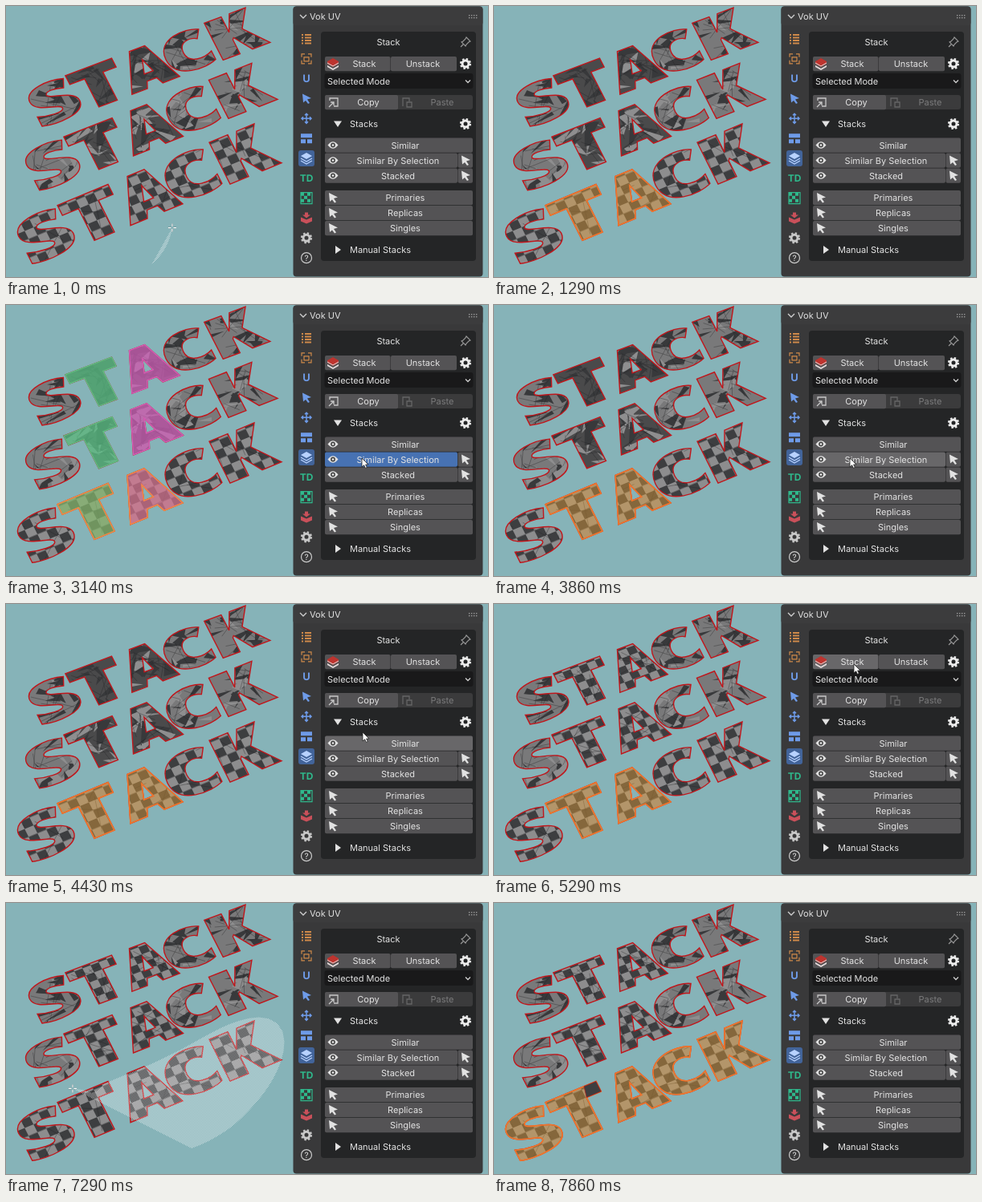
Animation, 600 px wide and 338 px high, one loop 8000 ms. Source, as an HTML page:

```html
<!DOCTYPE html>
<html lang="en">
<head>
<meta charset="utf-8">
<title>Stack islands</title>
<style>
html, body { margin: 0; width: 100%; height: 100%; overflow: hidden; background: #86b3b8; }
svg { display: block; width: 100vw; height: 100vh; }
text { font: 11px Inter, sans-serif; fill: #e2e2e2; text-rendering: geometricPrecision; }
.mid { text-anchor: middle; }
.btn { fill: #545355; }
.btn.hover { fill: #686769; }
.btn.on { fill: #4772b3; }
#letters path { vector-effect: non-scaling-stroke; fill-rule: evenodd; }
.wire { stroke: #242526; stroke-width: .5; opacity: .7; fill: none; }
.edge { fill: none; stroke: #c0161b; stroke-width: 1.4; }
.sel { fill: rgba(232, 160, 55, .42); stroke: #f0762c; stroke-width: 1.6; }
</style>
</head>
<body>
<svg viewBox="0 0 600 338" preserveAspectRatio="none">
  <defs>
    <pattern id="checker" width="22" height="38" patternUnits="userSpaceOnUse">
      <path d="M0 0h22v38H0z" fill="#8d8d8e"/>
      <path d="M0 0h11v38h11V19H0z" fill="#3d3e40"/>
    </pattern>
    <pattern id="mist" width="2" height="2" patternUnits="userSpaceOnUse">
      <path d="M0 0h1v2h1V1H0z" fill="#fff" opacity=".5"/>
    </pattern>
    <path id="loop1" d="M181 323Q203 303 207 276C228 235 215 205 150 208S40 250 70 285 130 305 150 300"/>
    <path id="loop2" d="M231 306Q275 290 303 258C370 190 365 100 250 165S120 215 112 240C95 225 10 225 8 270S20 330 110 315"/>
  </defs>
  <g id="letters"></g>
  <path id="lasso" fill="url(#mist)"/>
  <g id="panel"></g>
  <g id="cross" fill="none">
    <path d="M-5 0H-1.500M1.500 0H5M0-5V-1.500M0 1.500V5" stroke="#333" stroke-width="2" opacity=".35"/>
    <path d="M-5 0H-1.500M1.500 0H5M0-5V-1.500M0 1.500V5" stroke="#fff" stroke-width="1.100"/>
  </g>
  <path id="arrow" d="M0 0V11L2.600 8.700 4.400 12.400 6.300 11.500 4.600 8H8z" fill="#fff" stroke="#222" stroke-width=".8"/>
</svg>
<script>
const $ = id => document.getElementById(id);

// ---- letters: upright glyphs, 100 high, on three slanted baselines ----
const glyphs = {
  S: 'M54-95C36-106 2-102 2-70C2-40 36-42 36-29C36-17 14-22 2-30V-5C18 4 60 4 60-32C60-60 25-60 25-72C25-82 40-80 49-74z',
  T: 'M0-100H63V-76H45V0H20V-76H0z',
  A: 'M0 0L22-100H43L65 0H42L38-17H25L21 0zM32-70L26-36H38z',
  C: 'M55-91C40-107 0-104 0-50C0 6 42 4 57-8V-31C45-20 24-20 24-50C24-80 40-80 48-71z',
  K: 'M0 0V-100H23V-58L34-100H56L40-55 64 0H40L25-42 23-38V0z'
};
const starts = { S: 32, T: 90, A: 155, C: 214, K: 279 };
const rows = ['.915 -.346 .235 .46 15 164', '.955 -.375 .245 .48 10.5 245', '1 -.415 .26 .52 0 338'];
const tints = { T: '#58c486', A: '#d25fba' };

function seeded(seed) {
  return () => {
    seed = Math.imul(seed ^ seed >>> 15, 0x2c1b3c6d) + 0x9e3779b9 | 0;
    return ((seed ^ seed >>> 13) >>> 0) / 4294967296;
  };
}

const repeat = (n, make) => Array.from({ length: n }, (_, i) => make(i)).join('');
const poly = points => 'M' + points.map(p => p.map(v => v.toFixed(1)).join(' ')).join('L') + 'z';

function shards(rand, light) {
  return repeat(20, () => {
    const x = rand() * 64, y = -rand() * 100, angle = rand() * 2 * Math.PI;
    const reach = 20 + rand() * 40, spread = .08 + rand() * .22;
    const tip = s => [x + Math.cos(angle + s) * reach * .7, y + Math.sin(angle + s) * reach];
    return `<path d="${poly([[x, y], tip(spread), tip(-spread)])}" fill="${rand() < light ? '#8e8e8f' : '#38393b'}"/>`;
  });
}

function letter(row, name, index) {
  const d = glyphs[name], rand = seeded(row * 977 + index * 131 + 17);
  const plain = row === 2, paired = name in tints;
  const paint = (cls, extra = '') => `<path class="${cls}" d="${d}" ${extra}/>`;
  const wire = () => `M${rand() * 64} ${-rand() * 100}L${rand() * 64} ${-rand() * 100}`;
  let out = `<g transform="translate(${starts[name]})"><g clip-path="url(#cut${name})">`;
  if (!plain) out += paint('', `fill="${paired ? '#4a4a4b' : '#79797a'}"`) + shards(rand, row ? .45 : .15);
  if (plain || paired) out += paint(plain ? '' : 'stacked', 'fill="url(#checker)"');
  out += `<path class="wire" d="${repeat(plain ? 4 : 10, wire)}"/></g>` + paint('edge');
  if (plain) out += paint(`sel ${paired ? 'first' : 'rest'}`);
  if (plain && name === 'T') out += '<path class="rest" d="M45-76L48-100H63V-76z" fill="#3d3e40" stroke="#a5201f" stroke-width=".8"/>';
  if (paired) {
    const tint = tints[name];
    out += paint('tint', `fill="${tint}" fill-opacity="${plain ? .48 : .72}" stroke="${plain ? '#f08a48' : tint}" stroke-width="1.2"`);
  }
  return out + '</g>';
}

$('letters').innerHTML =
  Object.keys(glyphs).map(n => `<clipPath id="cut${n}"><path d="${glyphs[n]}" clip-rule="evenodd"/></clipPath>`).join('') +
  rows.map((m, row) => `<g transform="matrix(${m})">${[...'STACK'].map((n, i) => letter(row, n, i)).join('')}</g>`).join('');

// ---- panel ----
const label = (x, y, s, cls = '', style = '') => `<text x="${x}" y="${y + 4}" class="${cls}" style="${style}">${s}</text>`;
const mid = (x, y, s, style) => label(x, y, s, 'mid', style);
const rect = (x, y, w, h, fill, r = 3) => `<rect x="${x}" y="${y}" width="${w}" height="${h}" rx="${r}" fill="${fill}"/>`;
const button = (x, y, w, id = '') => `<rect x="${x}" y="${y - 9}" width="${w}" height="18.3" rx="2" class="btn" id="${id}"/>`;
const at = (x, y, body) => `<g transform="translate(${x} ${y})">${body}</g>`;
const solid = (d, fill = '#e2e2e2') => `<path d="${d}" fill="${fill}"/>`;
const line = (d, color = '#d0d0d0', width = 1.3) => `<path d="${d}" fill="none" stroke="${color}" stroke-width="${width}"/>`;
const pointer = fill => solid('M-5-6L6-.5 1 1 4 5.500 2 6.500-1 2.500-4 5z', fill);
const gear = (color = '#ececec') => `<g fill="none" stroke="${color}"><circle r="4" stroke-width="3"/>
  <circle r="6" stroke-width="2.200" stroke-dasharray="2.356"/></g>`;
const eye = solid('M-6.500 0Q0-8.500 6.500 0 0 8.500-6.500 0z') + '<circle r="2.900" fill="#444"/><circle r="1.300" fill="#eee"/>';
const blue = '#6e9be8', orange = '#cf8a4a', green = '#2fb98c', red = '#c9505a', ice = '#b8d2ff';

const tabs = [
  line('M-6-5h2M-2-5h8M-6-1.500h2M-2-1.500h8M-6 2h2M-2 2h8M-6 5.500h2M-2 5.500h8', orange, 1.8),
  line('M-6-2V-6H-2M2-6H6V-2M6 2V6H2M-2 6H-6V2M-3-2H3V3H-3z', orange, 1.2),
  mid(0, 0, 'U', `font-weight:700;font-size:13px;fill:${blue}`),
  pointer(blue),
  line('M-6 0H6M0-6V6M-4-2L-6 0-4 2M4-2L6 0 4 2M-2-4L0-6 2-4M-2 4L0 6 2 4', blue, 1.5),
  solid('M-7-6H7V-1H-7zM-7 1H-1V6H-7zM1 1H7V6H1z', blue),
  rect(-10, -10, 20, 20, '#42649a') + solid('M0-7L7-3 0 1-7-3z', ice) + line('M-7 0L0 4 7 0M-7 3L0 7 7 3', ice),
  mid(0, 0, 'TD', `font-weight:700;font-size:12px;fill:${green}`),
  line('M-7-7H7V7H-7z', green, 1.2) + solid('M-7-7h4v4h4v-4h4v4h-4v4h4v4h-4v-4h-4v4h-4v-4h4v-4h-4z', green),
  solid('M-7-1L0 2 7-1V4L0 7-7 4zM-2-7H2V-4H5L0 0-5-4H-2z', red),
  gear('#c8c8c8'),
  '<circle r="6.500" fill="none" stroke="#ccc" stroke-width="1.200"/>' + mid(0, 0, '?', 'font-size:10px')
];

const stackIcon = solid('M-7 2L0 6 7 2V4L0 8-7 4z', '#e6dcdc') + solid('M-7-3L0-7 7-3V0L0 4-7 0z', '#bd342f') + line('M-7-1L0 3 7-1', '#eee', .9);
const overlays = [['Similar', 'similar'], ['Similar By Selection', 'bySelection'], ['Stacked', '']];

$('panel').innerHTML = [
  rect(357.5, .5, 236, 337, '#39393a', 4), rect(357.5, .5, 236, 24, '#3c3c3d', 4),
  at(370, 13, line('M-4-2L0 2 4-2')), label(378, 13, 'Vok UV'),
  at(580, 13, repeat(8, i => rect(i % 4 * 3 - 4, i < 4 ? -2 : 1, 1.4, 1.4, '#999', 0))),
  ...tabs.map((body, i) => at(374, 41 + i * 24.83, body)),
  rect(392, 32, 193, 286, '#242526', 4),
  mid(476, 45, 'Stack'), at(572, 45, line('M1-6L6-1 4 0 1 3 0 5-5 0-3-1 0-4zM-3 3L-6 6', '#9a9a9a', 1.1)),
  button(397, 72, 81.5, 'stack'), button(479, 72, 82), at(407, 72, stackIcon),
  mid(446, 72, 'Stack'), mid(519, 72, 'Unstack'), at(572, 72, gear()),
  rect(396.5, 84, 185, 19, '#19191a'), label(400, 93.5, 'Selected Mode'), at(575, 94, line('M-3-1.500L0 1.500 3-1.500')),
  rect(397, 111, 184, 18, '#3b3b3c'), button(397, 120, 91), mid(451, 120, 'Copy'), mid(543, 120, 'Paste', 'fill:#7b7b7c'),
  at(408, 120, line('M-5-2V-5H5V5H0M-6 6L0 0M-4 0H0V4', '#c8c8c8')),
  at(499, 120, line('M-5 5V-5H3V-1M0 0H6V6H0zM-2-5H1', '#666')),
  at(413, 147, solid('M-5-3.500H5L0 4z')), label(428, 147, 'Stacks'), at(572, 147, gear()),
  ...overlays.map(([name, id], i) => {
    const y = 173.5 + i * 19;
    const pick = i ? button(562.5, y, 18.5) + at(572, y, pointer()) : '';
    return button(397, y, i ? 165 : 184, id) + pick + at(407, y, eye) + mid(i ? 488 : 497, y, name);
  }),
  ...['Primaries', 'Replicas', 'Singles'].map((name, i) => {
    const y = 239 + i * 19;
    return button(397, y, 184) + at(407, y, pointer()) + mid(497, y, name);
  }),
  at(413, 304, solid('M-3-5V5L4 0z')), label(428, 304, 'Manual Stacks')
].join('');

// ---- motion ----
const lassos = [
  { path: $('loop1'), from: -177, to: 1130, power: 1 },
  { path: $('loop2'), from: 6280, to: 7600, power: 1.41 }
];
// Pointer moves: start, end, x, y.
const moves = [[1430, 2000, 443, 191], [3850, 4280, 444, 160], [4570, 4850, 448, 75], [5420, 6280, 231, 306]];

const within = (t, from, to) => t >= from && t < to;

function pointerAt(t) {
  return moves.reduce(([x, y], [from, to, nx, ny]) => {
    const k = Math.min(1, Math.max(0, (t - from) / (to - from))), ease = k * k * (3 - 2 * k);
    return [x + (nx - x) * ease, y + (ny - y) * ease];
  }, [300, 270]);
}

function trail({ path, from, to, power }, t) {
  const reach = path.getTotalLength() * ((t - from) / (to - from)) ** power, count = 40;
  return Array.from({ length: count + 1 }, (_, i) => {
    const p = path.getPointAtLength(reach * i / count);
    return [p.x, p.y];
  });
}

const show = (nodes, on) => nodes.forEach(n => n.style.display = on ? '' : 'none');
const groups = Object.fromEntries(['first', 'rest', 'tint', 'stacked'].map(n => [n, [...document.querySelectorAll('.' + n)]]));
const LOOP = 8000, STEP = LOOP / 56;

function render(t) {
  const lasso = lassos.find(l => within(t, l.from, l.to));
  const points = lasso ? trail(lasso, t) : [pointerAt(t)];
  const [x, y] = points[points.length - 1], inPanel = x > 358 && !lasso;
  const visible = lasso || within(t, 1430, 6280);
  show([$('cross')], visible && !inPanel);
  show([$('arrow')], visible && inPanel);
  for (const id of ['cross', 'arrow']) $(id).setAttribute('transform', `translate(${x} ${y})`);
  $('lasso').setAttribute('d', lasso ? poly(points) : '');

  const whole = t >= 7600, coloured = within(t, 2420, 3850);
  show(groups.first, within(t, 1130, 5850) || whole);
  show(groups.rest, whole);
  show(groups.tint, coloured);
  show(groups.stacked, t >= 4990);

  const state = (id, cls, on) => $(id).classList.toggle(cls, on);
  state('bySelection', 'hover', within(t, 1990, 3990));
  state('bySelection', 'on', coloured);
  state('similar', 'hover', within(t, 3990, 4700));
  state('stack', 'hover', within(t, 4840, 5560));
}

const start = performance.now();
function tick() {
  const t = Math.max(0, performance.now() - start) % LOOP;
  render(Math.floor((t + 4) / STEP) % 56 * STEP);
  requestAnimationFrame(tick);
}
tick();
</script>
</body>
</html>
```
